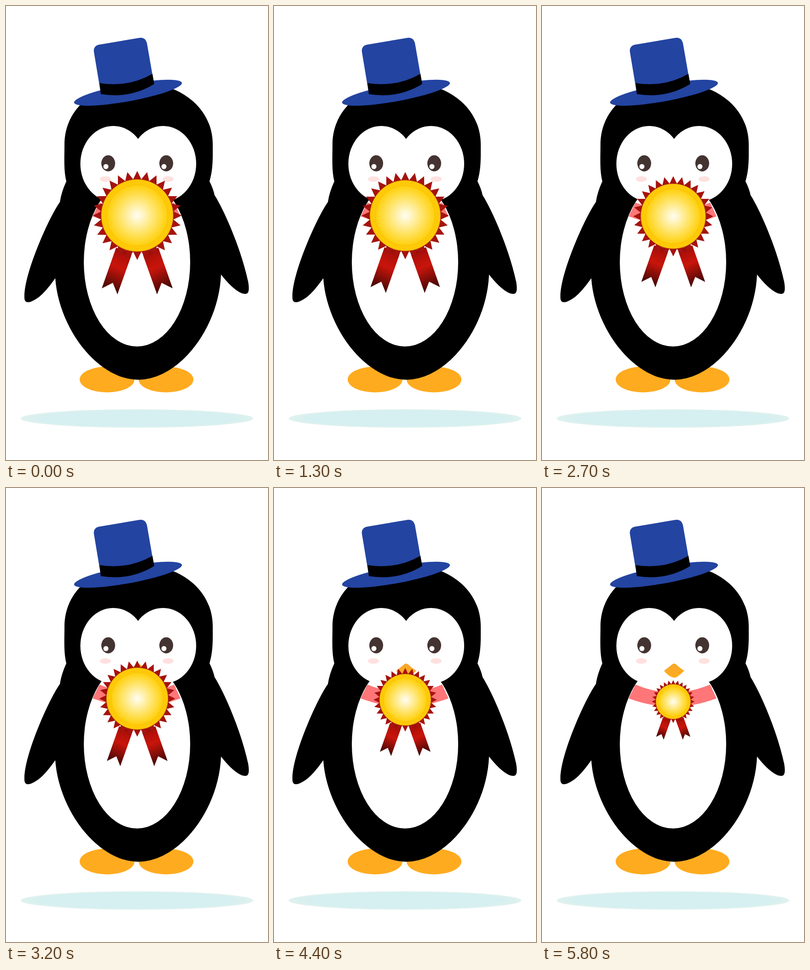
An HTML page that plays this animation: 569x984 px, repeating every 7800 ms.

```html
<!DOCTYPE html>
<html lang="en">
<head>
<meta charset="utf-8">
<title>Penguin with medal</title>
<style>
  html, body { margin: 0; width: 100%; height: 100%; overflow: hidden; background: #fff; }
  svg { display: block; width: 100%; height: 100%; }
</style>
</head>
<body>
<svg viewBox="0 0 569 984">
  <defs>
    <radialGradient id="shade">
      <stop offset=".85" stop-color="#d6eff0"/>
      <stop offset="1" stop-color="#e0f2ee"/>
    </radialGradient>
    <radialGradient id="shine">
      <stop offset="0" stop-color="#fffdf4"/>
      <stop offset=".2" stop-color="#fff5c4"/>
      <stop offset=".6" stop-color="#ffe364"/>
      <stop offset="1" stop-color="#ffd00c"/>
    </radialGradient>
    <linearGradient id="cloth" x1=".65" y1="0" x2=".35" y2="1">
      <stop offset="0" stop-color="#8c0b06"/>
      <stop offset=".15" stop-color="#b01008"/>
      <stop offset=".42" stop-color="#c9150b"/>
      <stop offset=".72" stop-color="#7c0d08"/>
      <stop offset="1" stop-color="#310504"/>
    </linearGradient>
    <linearGradient id="bill" x1="0" y1="0" x2="0" y2="1">
      <stop offset="0" stop-color="#f9a62b"/>
      <stop offset="1" stop-color="#ffad1c"/>
    </linearGradient>
    <clipPath id="belly"><ellipse cx="284.5" cy="555" rx="115.5" ry="183"/></clipPath>
    <g id="eye">
      <ellipse rx="15" ry="17.5" fill="#433331"/>
      <circle cx="-5" cy="7" r="5.5" fill="#fff"/>
    </g>
    <path id="ribbon" d="M-46 70 L-11 80 L-14 90 L-43 171 L-53 146 L-77 158Z" fill="url(#cloth)"/>
  </defs>

  <ellipse cx="284.5" cy="894" rx="252.5" ry="20" fill="url(#shade)"/>
  <g fill="#ffab1f">
    <ellipse cx="219.5" cy="809.5" rx="59.5" ry="28"/>
    <ellipse cx="347.5" cy="809.5" rx="59.5" ry="28"/>
  </g>

  <path d="M131 380C125 355 127 330 127 300C127 222 195 166 288 166C380 166 449 222 449 300
    C449 330 450 352 442 380Q450 396 453 410C475 445 510 525 526 598C529 616 527 624 520 624
    C505 624 485 605 467 582C462 700 375 810 287 810C200 810 115 700 107 590
    C100 600 80 628 62 637C50 644 40 645 40 632C38 580 95 455 117 425Q120 404 131 380Z"/>
  <g fill="#fff">
    <ellipse cx="284.5" cy="555" rx="115.5" ry="183"/>
    <ellipse cx="233" cy="342" rx="71.5" ry="82"/>
    <ellipse cx="341" cy="342" rx="72" ry="82"/>
    <rect x="230" y="310" width="112" height="110"/>
  </g>
  <path d="M203 426Q284 460 365 426L379 456Q284 492 188 456Z" fill="#ff7678" clip-path="url(#belly)"/>

  <use href="#eye" x="222" y="341"/>
  <use href="#eye" x="348" y="341"/>
  <g fill="#ffe1df">
    <ellipse cx="216" cy="375" rx="12" ry="6"/>
    <ellipse cx="352" cy="375" rx="12" ry="6"/>
  </g>
  <path d="M265 396Q276 388 283 382Q287 379 291 382Q298 389 309 396Q301 404 294 409Q287 413 280 409Q272 405 265 396Z" fill="url(#bill)"/>

  <g fill="#2344a1">
    <ellipse cx="265" cy="188" rx="119" ry="18.5" transform="rotate(-10.4 265 188)"/>
    <path d="M206 190L191 100Q189 87 201 84L290 69Q302 67 306 80L321 166Q270 200 206 190Z"/>
  </g>
  <path d="M203 167Q266 177 318 147L322 169Q270 201 206 191Z"/>

  <g id="medal">
    <use href="#ribbon"/>
    <use href="#ribbon" transform="scale(-1 1)"/>
    <path id="spikes" fill="#a5130e"/>
    <circle r="78" fill="#ffc907" stroke="#d99a08" stroke-width=".8"/>
    <circle r="66" fill="url(#shine)" stroke="#f3bd0c" stroke-width=".8"/>
  </g>
</svg>
<script>
  const LOOP = 7800, STEP = 100, SHRINK_END = 5800, SPIKES = 28;
  const medal = document.getElementById('medal');

  const corners = Array.from({ length: SPIKES * 2 }, (_, i) => {
    const angle = i * Math.PI / SPIKES, radius = i % 2 ? 79 : 96.5;
    return `${radius * Math.sin(angle)} ${-radius * Math.cos(angle)}`;
  });
  document.getElementById('spikes').setAttribute('d', `M${corners.join('L')}Z`);

  function draw(now) {
    const time = Math.floor(now % LOOP / STEP) * STEP;
    const linear = Math.min(1, Math.max(0, (time - STEP) / (SHRINK_END - STEP)));
    const eased = linear ** 2.1;
    medal.setAttribute('transform', `translate(285 ${454 + 9 * eased}) scale(${1 - 0.517 * eased})`);
  }

  const start = performance.now();
  function tick() {
    draw(performance.now() - start);
    requestAnimationFrame(tick);
  }
  tick();
</script>
</body>
</html>
```
